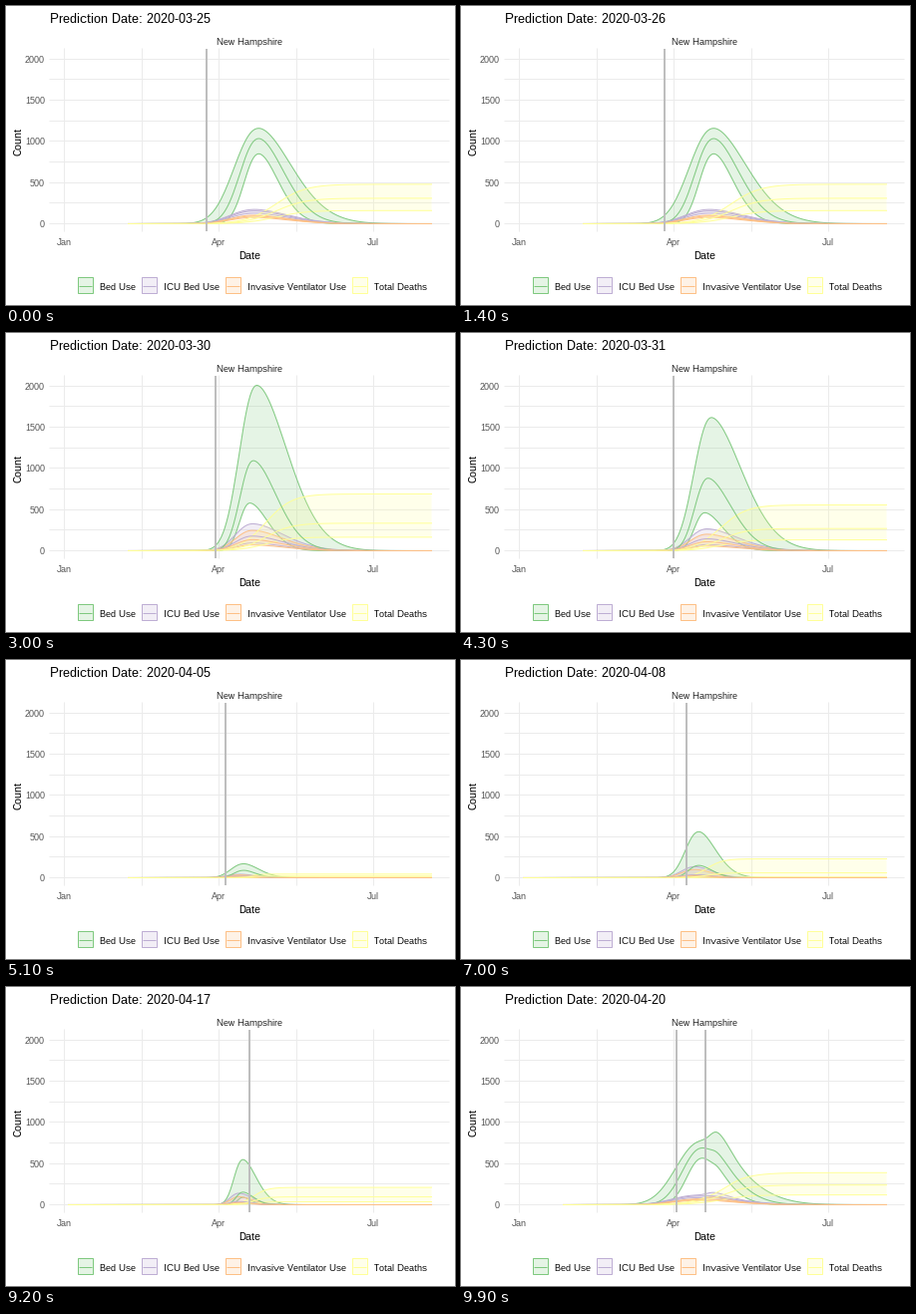
A matplotlib script that plays this animation: 450x300 px, repeating every 10000 ms.

```python
import numpy as np
import matplotlib.pyplot as plt
from matplotlib.animation import FuncAnimation
from matplotlib.patches import Polygon, Rectangle

plt.rcParams.update({
    "font.family": "Liberation Sans",
    "text.hinting": "native",
    "text.hinting_factor": 1,
})

W, H, POINTS = 450, 300, 180
FRAMES, STEP = 100, 100
LEFT, RIGHT, TOP, BOTTOM = 44, 444, 43, 226
ZERO, PER_COUNT, DAY = 218, 0.0826, 155 / 91
X_END = 426
COLORS = ["#7FC97F", "#BEAED4", "#FDC086", "#FFFF99"]
GRID = "#EBEBEB"
NARROWING = (1, 0.77, 0.6)  # widths of the upper, middle and lower bed curves

DATES = ["03-25", "03-26", "03-27", "03-29", "03-30", "03-31", "04-01",
         "04-05", "04-07", "04-08", "04-10", "04-13", "04-17", "04-20"]
STARTS = [4, 13, 20, *range(28, 99, 7)]


def day_of_year(date):
    month, day = map(int, date.split("-"))
    return 59 + 31 * (month - 3) + day


DAYS = [day_of_year(d) for d in DATES]


# ---- curves -------------------------------------------------------------
def bell(x, amp, mid, left, right):
    """Lopsided peak; left and right are the widths at half height."""
    d = x - mid
    fall = np.where(d < 0, np.abs(d / left) ** 2.2, np.abs(d / right) ** 1.8)
    return amp * 0.5 ** fall


def rise(x, total, mid, scale):
    return total / (1 + np.exp((mid - x) / scale))


def forecast(x0, mid, left, right, bed, icu, vent, deaths, rate, lean=0):
    """Rows: x, then upper, middle and lower curve of each measure."""
    x = np.linspace(x0, X_END, POINTS)
    rows = [bell(x, a, mid - lean * k, left * s, right * s)
            for k, (a, s) in enumerate(zip(bed, NARROWING))]
    for share in (icu, vent):
        rows += [bell(x, a * share, mid - 4, left, right) for a in bed]
    rows += [rise(x, d, *rate) for d in deaths]
    return np.array([x] + [ZERO - PER_COUNT * r for r in rows])


def mix(a, b, p):
    out = a + (b - a) * p
    out[1:] = np.minimum(out[1:], ZERO)
    return out


MAR25 = forecast(122, 253, 28, 39, (1160, 1035, 850), 0.15, 0.09,
                 (480, 310, 160), (270, 15))
MAR28 = forecast(122, 261, 23, 36, (1670, 1080, 640), 0.16, 0.113,
                 (640, 340, 145), (266, 14))
MAR30 = forecast(122, 251, 20, 36, (2010, 1095, 580), 0.163, 0.123,
                 (690, 335, 165), (260, 13), lean=3.5)
APR05 = forecast(122, 238, 15, 18, (170, 90, 12), 0.25, 0.2,
                 (45, 20, 8), (243, 5))
APR08 = forecast(62, 238, 15.5, 20, (560, 150, 30), 0.24, 0.18,
                 (230, 60, 10), (246, 8))
APR14 = forecast(62, 237, 11, 15, (510, 130, 50), 0.28, 0.18,
                 (215, 80, 20), (247, 6.5))
APR20 = forecast(62, 237, 10, 16, (560, 160, 100), 0.25, 0.18,
                 (210, 100, 40), (248, 7))

STATES = [MAR25] * 3 + [
    mix(MAR25, MAR28, 4 / 3), MAR30,
    mix(MAR30, APR05, 0.12), mix(MAR30, APR05, 0.25), APR05, APR05,
    mix(APR08, APR14, -0.3), mix(APR08, APR14, 0.6),
    mix(APR14, APR20, -0.2), mix(APR14, APR20, 0.4), APR20]


def moment(frame):
    """State index and progress towards the next state."""
    for i, start in enumerate(STARTS):
        steps = 4 if start == 20 else 3
        if frame < start + steps - 1:
            return i, max(0, frame - start + 1) / steps


# ---- fixed parts --------------------------------------------------------
fig = plt.figure(figsize=(W / 72, H / 72), dpi=72, facecolor="white")
ax = fig.add_axes([0, 0, 1, 1])
ax.set(xlim=(0, W), ylim=(H, 0))
ax.axis("off")


def label(x, y, text, size=9, color="black", **kw):
    return ax.text(x, y, text, size=size, color=color, va="baseline", **kw)


def stroke(x, y, color, z):
    return ax.plot(x, y, color=color, lw=1, snap=False, zorder=z)[0]


for gx in (58, 136, 213, 291, 368):
    stroke([gx + 0.5] * 2, [TOP, BOTTOM], GRID, 1)
for k in range(9):
    gy = round(ZERO - k * 250 * PER_COUNT) + 0.5
    stroke([LEFT, RIGHT], [gy, gy], GRID, 1)
    if k % 2 == 0:
        label(39, gy + 3.5, str(k * 250), color="#4D4D4D", ha="right")
for tx, month in ((58, "Jan"), (213, "Apr"), (368, "Jul")):
    label(tx, 240, month, color="#4D4D4D", ha="center")

title = label(44, 17, "", 13)
label(244, 39, "New Hampshire", color="#1A1A1A", ha="center")
label(244, 254, "Date", 11, ha="center")
label(15, 136, "Count", 11, ha="center", rotation=90, rotation_mode="anchor")

KEYS = [(72, "Bed Use"), (136, "ICU Bed Use"),
        (220, "Invasive Ventilator Use"), (347, "Total Deaths")]
for (kx, text), c in zip(KEYS, COLORS):
    box = (kx + 0.5, 272.5)
    ax.add_patch(Rectangle(box, 15, 16, fc=c, alpha=0.2, lw=0, snap=False))
    ax.add_patch(Rectangle(box, 15, 16, fc="none", ec=c, lw=1, snap=False))
    stroke([kx + 2, kx + 14], [281.5, 281.5], c, 2)
    label(kx + 22, 285, text)

# ---- moving parts -------------------------------------------------------
bands, edges, centers = [], [], []
for j, c in enumerate(COLORS):
    band = Polygon([[0, 0]], fc=c, alpha=0.2, lw=0, zorder=2 + j * 0.1)
    bands.append(ax.add_patch(band))
    edges.append([stroke([], [], c, 2.05 + j * 0.1) for _ in range(2)])
    centers.append(stroke([], [], c, 3 + j * 0.1))
bars = [ax.add_patch(Rectangle((0, TOP), 2, BOTTOM - TOP, fc="#BEBEBE", lw=0,
                               zorder=4)) for _ in range(2)]


def place_bar(bar, day):
    bar.set_x(round(58.1 + day * DAY - 1))


def draw(frame):
    i, p = moment(frame)
    j = (i + 1) % len(STATES)
    now = mix(STATES[i], STATES[j], p)

    x = now[0] + 0.5
    for k in range(4):
        up, mid, low = now[1 + 3 * k:4 + 3 * k] + 0.5
        bands[k].set_xy(np.column_stack([np.r_[x, x[::-1]], np.r_[up, low[::-1]]]))
        edges[k][0].set_data(x, up)
        edges[k][1].set_data(x, low)
        centers[k].set_data(x, mid)

    # The last date keeps its own bar while a second one travels back.
    day = DAYS[i] + (DAYS[j] - DAYS[i]) * p
    place_bar(bars[0], day)
    place_bar(bars[1], DAYS[i] if j == 0 else day)
    title.set_text("Prediction Date: 2020-" + DATES[j if p > 0.7 else i])
    return []


anim = FuncAnimation(fig, draw, frames=FRAMES, interval=STEP, repeat=True,
                     repeat_delay=0, init_func=lambda: draw(0), blit=False)
plt.show()
```
